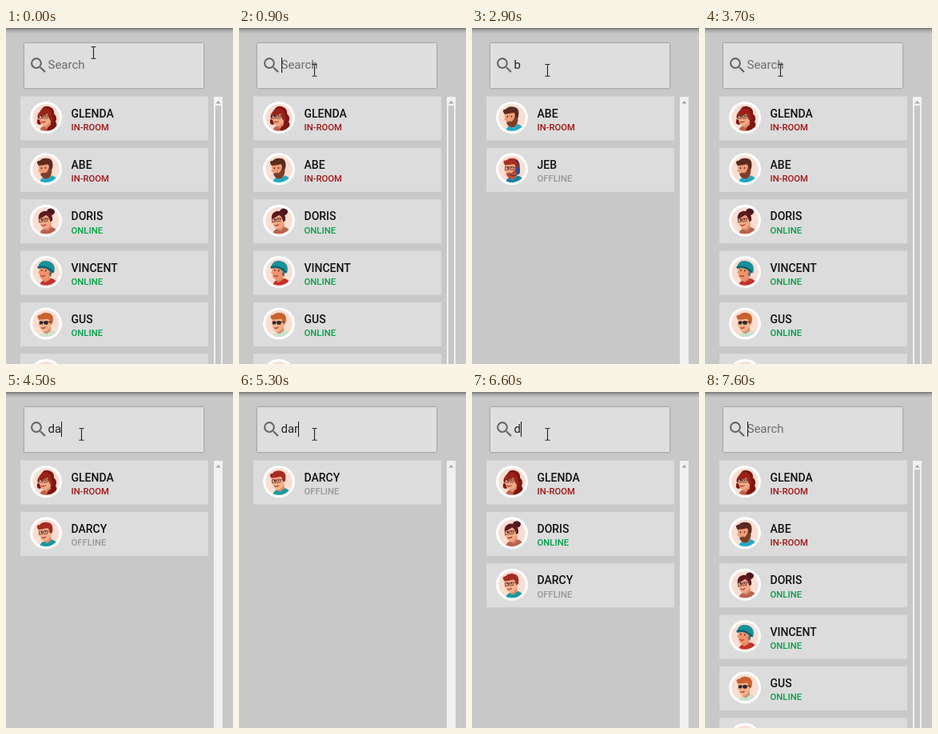
An HTML page for the animation above (7.7 s loop, 284 px wide and 420 px high).

```html
<!DOCTYPE html>
<html lang="en">
<head>
<meta charset="utf-8">
<title>Contact search</title>
<style>
  html, body { margin: 0; width: 100%; height: 100%; overflow: hidden; background: #c8c8c8; }
  svg { display: block; }
  text { font-family: Roboto, "Open Sans", sans-serif; }
  .field { font-size: 15px; }
  .name { font-size: 14px; font-weight: 500; fill: #111; }
  .status { font-size: 11.3px; font-weight: 500; }
  .in-room { fill: #a31515; }
  .online { fill: #00a045; }
  .offline { fill: #999; }
  .box { filter: drop-shadow(0 .8px .9px rgba(0, 0, 0, .45)); }
</style>
</head>
<body>
<svg width="284" height="420" viewBox="0 0 284 420">
  <defs>
    <linearGradient id="shade" x2="0" y2="1">
      <stop offset="0" stop-color="#000" stop-opacity=".42"/>
      <stop offset=".4" stop-color="#000" stop-opacity=".17"/>
      <stop offset="1" stop-color="#000" stop-opacity="0"/>
    </linearGradient>
    <clipPath id="disc"><circle r="16.8"/></clipPath>
  </defs>
  <rect width="284" height="420" fill="#c8c8c8"/>
  <rect width="284" height="7" fill="url(#shade)"/>

  <rect class="box" x="23" y="19" width="224" height="56" fill="#dedede"/>
  <path transform="translate(27.8 33.9) scale(1.07)" fill="#666" d="M15.5 14h-.79l-.28-.27A6.47 6.47 0 0 0 16 9.5 6.5 6.5 0 1 0 9.5 16c1.61 0 3.09-.59 4.23-1.57l.27.28v.79l5 4.99L20.49 19l-4.99-5zm-6 0C7.01 14 5 11.99 5 9.5S7.01 5 9.5 5 14 7.01 14 9.5 11.99 14 9.5 14z"/>
  <text class="field" id="hint" x="52.5" y="51" fill="#6c6c6c">Search</text>
  <text class="field" id="typed" x="52.5" y="51" fill="#222"></text>
  <rect id="caret" y="37" width="1" height="19" fill="#111"/>

  <g id="list"></g>

  <rect x="260" y="86" width="11" height="334" fill="#f1f1f1"/>
  <path d="M262.5 94.4l3-3.4 3 3.4z" fill="#a3a3a3"/>
  <rect id="thumb" x="262" y="97" width="7" height="323" fill="#c6c6c6"/>

  <path id="pointer" d="M-3 -7.5h2.2l.8 .8l.8 -.8h2.2M0 -7v14M-3 7.2h2.2l.8 -.8l.8 .8h2.2" fill="none" stroke="#222" stroke-width="1.1"/>
</svg>
<script>
const LOOP = 7700;
const byId = id => document.getElementById(id);

// Avatar parts, drawn around the centre of the disc
const shape = (d, fill) => `<path d="${d}" fill="${fill}"/>`;
const oval = (x, y, rx, ry, fill) => `<ellipse cx="${x}" cy="${y}" rx="${rx}" ry="${ry}" fill="${fill}"/>`;
const line = (d, color, w = 1) => `<path d="${d}" fill="none" stroke="${color}" stroke-width="${w}"/>`;
const tilt = (angle, parts) => `<g transform="rotate(${angle})">${parts}</g>`;
const shirt = color => shape('M-8 17Q-7 11 -1 10L5 8Q13 8 15 17Z', color);
const face = (skin = '#f3a884') => shape('M-3 4L6 2V9L1 13L-3 11Z', '#dc8b6a') +
  shape('M-9 -4Q-8 -9 -1 -9Q7 -8 7 0Q6 7 0 10Q-5 11 -7 6L-8 3L-10 2L-8.5 -1Z', skin);
const eyes = oval(-5.5, -1.5, .8, .9, '#3a2020') + oval(-.5, -1.5, .8, .9, '#3a2020');
const smile = line('M-6 5Q-3.5 7 -.5 4.6', '#a8352c', 1.2);
const specs = line('M-8.5 -3h4v4h-4zM-2.8 -3h4.6v4h-4.6zM-4.5 -1.5h1.7M1.8 -2h4.5', '#6b3a35', .8);
const beard = color => shape('M7 -3Q9 7 2 12Q-5 13 -7.5 6Q-4 3 -1 5Q3 3 4 -3Z', color);
const quiff = color => shape('M-9 -5Q-13 -11 -7 -11Q-3 -15 4 -13Q11 -11 8 0L5 1Q5 -3 3 -6Q-4 -5 -9 -5Z', color);

const curls = shape('M-6 -9Q-4 -15 3 -14Q11 -12 10 -5Q15 0 12 5Q16 11 10 16H1Q4 11 4 6L-9 9Q-13 6 -10 1Q-12 -4 -6 -9Z', '#7e1712');
const fringe = shape('M-9 -2Q-8 -12 0 -12Q9 -10 8 6Q3 2 2 -5Q-4 -1 -9 -2Z', '#9c2219');

const art = {
  curly: shirt('#c3604b') + curls + face() + fringe + specs + eyes + smile,
  bearded: shirt('#20a9c9') + tilt(-4, face('#ee9c76') + beard('#7a3f29') + quiff('#5b2b20') + eyes),
  bun: oval(6, -11, 5, 4.2, '#4a161c') + shirt('#b8624c') + tilt(-6, face() +
    shape('M-9 -3Q-9 -11 -1 -12Q10 -11 8 1L5 2Q5 -4 1 -7Q-4 -4 -9 -3Z', '#5c1a1c') + specs + eyes + smile),
  beanie: shirt('#c8302a') + tilt(8, face('#f0926c') + shape('M5 -4L8 -4L7 5L4 3Z', '#6d6a6c') +
    shape('M-11 -3Q-11 -14 0 -14Q12 -13 10 0L6 -1L-1 -5Z', '#17919a') +
    line('M-11 -4Q-2 -9 9 -1', '#0f626e', 2.6) + eyes + smile),
  shades: shirt('#cbe3cd') + face('#f5b288') + quiff('#c9622f') +
    oval(-6, -1, 2.4, 2.2, '#2f2930') + oval(0, -1, 2.8, 2.3, '#2f2930') + line('M-8 -2H7', '#2f2930', .8) + smile,
  headset: shirt('#1e7fa6') + face('#f3a884') + beard('#c44a2a') + quiff('#a92f20') + specs + eyes +
    line('M5 -11Q11 -7 8 1', '#263a66', 1.6) + oval(7.5, 2, 2.6, 5, '#24508f') + line('M7 6Q4 10 -3 7', '#263a66'),
  tidy: shirt('#1599a3') + tilt(-5, face('#f5b08c') + quiff('#a62c22') + specs + eyes + smile),
};

const people = [
  ['GLENDA', 'IN-ROOM', 'curly'],
  ['ABE', 'IN-ROOM', 'bearded'],
  ['DORIS', 'ONLINE', 'bun'],
  ['VINCENT', 'ONLINE', 'beanie'],
  ['GUS', 'ONLINE', 'shades'],
  ['JEB', 'OFFLINE', 'headset'],
  ['DARCY', 'OFFLINE', 'tidy'],
];

byId('list').innerHTML = people.map(([name, status, look]) => `<g>
  <rect width="235" height="55" fill="#dcdcdc"/>
  <g transform="translate(32 26.5)">
    <circle r="20" fill="#fff"/><circle r="16.8" fill="#fbded3"/>
    <g clip-path="url(#disc)">${art[look]}</g>
  </g>
  <text class="name" x="63.5" y="26.3">${name}</text>
  <text class="status ${status.toLowerCase()}" x="63.5" y="42.4">${status}</text>
</g>`).join('');
const rows = [...byId('list').children];

// Focus, then each edit of the query
const edits = [
  [0, ''], [900, ''], [2100, 'b'], [3100, ''], [4000, 'd'], [4300, 'da'],
  [5200, 'dar'], [6000, 'da'], [6400, 'd'], [6800, ''],
];
const FOCUS = 900, LAST_EDIT = 6800;

const typed = byId('typed');
let shown = null;

function showQuery(query) {
  if (query === shown) return;
  shown = query;
  typed.textContent = query;
  byId('hint').style.display = query ? 'none' : '';
  byId('thumb').style.display = query ? 'none' : '';
  let slot = 0;
  rows.forEach((row, i) => {
    const match = people[i][0].toLowerCase().includes(query);
    row.style.display = match ? '' : 'none';
    if (match) row.setAttribute('transform', `translate(18 ${(85.5 + 64.35 * slot++).toFixed(2)})`);
  });
  const end = query ? typed.getComputedTextLength() : 0;
  byId('caret').setAttribute('x', Math.round(52.6 + end));
}

const ease = (t, from, to) => {
  const p = Math.min(1, Math.max(0, (t - from) / (to - from)));
  return p * p * (3 - 2 * p);
};

function draw(t) {
  const [start, query] = edits.findLast(([at]) => at <= t);
  showQuery(query);

  const lit = t >= LAST_EDIT || (t >= FOCUS && (t - start) % 1000 < 500);
  byId('caret').style.display = lit ? '' : 'none';

  const p = ease(t, 100, 800) - ease(t, 6800, 7100);
  const pointer = byId('pointer');
  pointer.setAttribute('transform', `translate(${Math.round(109 - 15 * p) + .5} ${Math.round(31 + 22 * p)})`);
  pointer.style.display = t < 7150 ? '' : 'none';
}

const begin = performance.now();
function tick() {
  draw((performance.now() - begin) % LOOP);
  requestAnimationFrame(tick);
}
tick();
</script>
</body>
</html>
```
